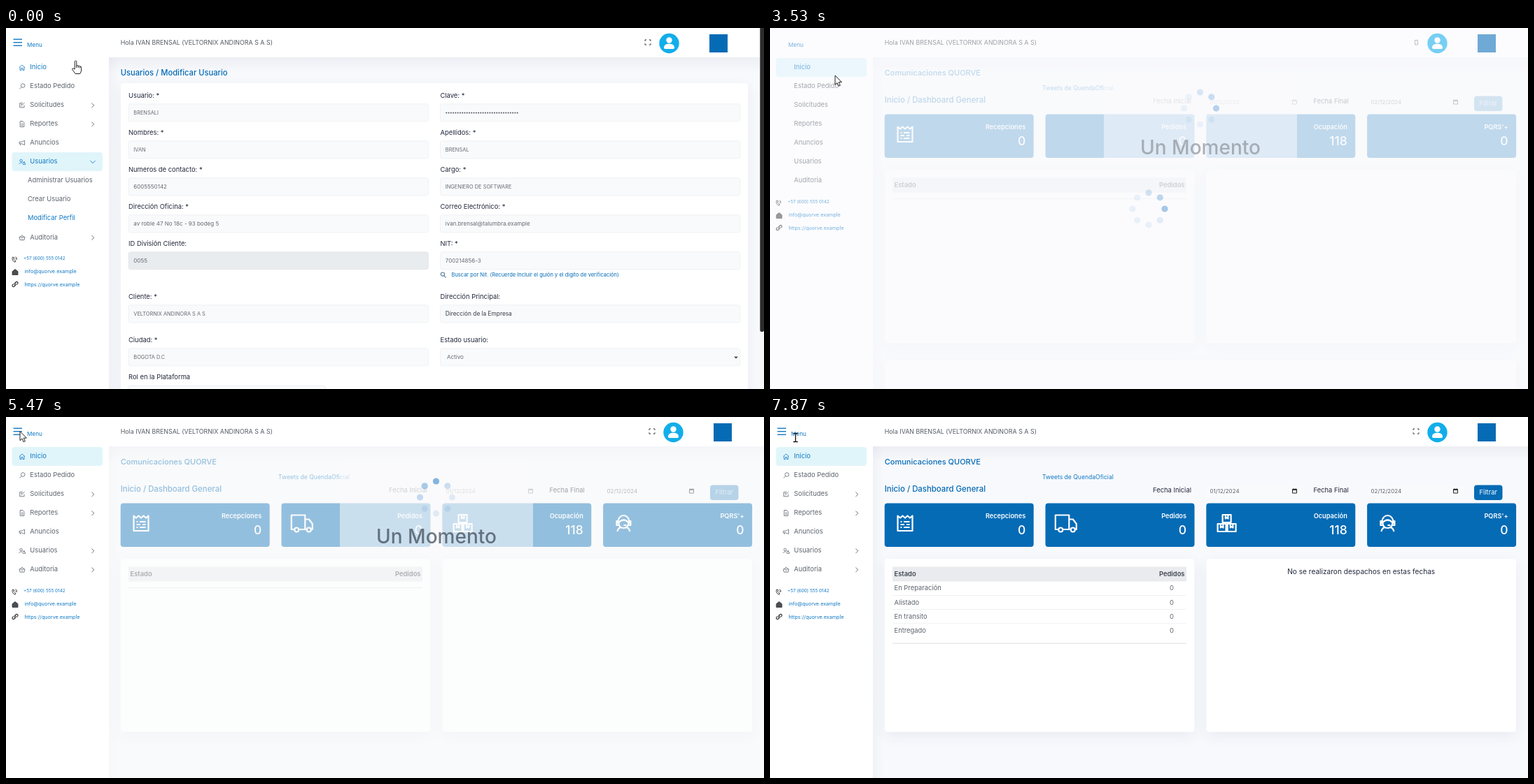
An HTML page with a canvas that plays this animation: 1083x517 px, repeating every 8 s.

```html
<!DOCTYPE html>
<html lang="es">
<head>
<meta charset="utf-8">
<title>Panel de usuarios</title>
<style>
html, body { margin: 0; width: 100%; height: 100%; overflow: hidden; background: #fff; }
canvas { display: block; width: 100%; height: 100%; }
</style>
</head>
<body>
<canvas id="stage"></canvas>
<script>
const W = 1083, H = 517, LOOP = 8000;
const canvas = document.getElementById('stage');
const g = canvas.getContext('2d');
const dpr = window.devicePixelRatio || 1;
canvas.width = W * dpr;
canvas.height = H * dpr;

const BLUE = '#056bb5', LINK = '#1179c4', GREY = '#5d646d', DARK = '#23283c';
const PILL = '#e0f5fa', PAGE = '#f8f9fc';

const clamp = v => Math.max(0, Math.min(1, v));
const ramp = (t, a, b) => clamp((t - a) / (b - a));

function text(s, x, y, size, color, weight = 400, align = 'left') {
  g.font = `${weight} ${size}px Inter, "Open Sans", sans-serif`;
  g.textAlign = align;
  g.fillStyle = color;
  g.fillText(s, x, y + size * 0.36);
}

function box(x, y, w, h, r, fill, stroke) {
  g.beginPath();
  g.roundRect(x, y, w, h, r);
  if (fill) { g.fillStyle = fill; g.fill(); }
  if (stroke) { g.strokeStyle = stroke; g.lineWidth = 0.8; g.stroke(); }
}

function dot(x, y, r, fill) {
  g.beginPath();
  g.arc(x, y, r, 0, 7);
  g.fillStyle = fill;
  g.fill();
}

function panel(x, y, w, h) {
  g.save();
  g.shadowColor = 'rgba(40,60,120,.07)';
  g.shadowBlur = 20 * dpr;
  g.shadowOffsetY = 6 * dpr;
  box(x, y, w, h, 4, '#fff');
  g.restore();
}

// Line icon given as a path around its own centre
function icon(d, x, y, color, lw = 0.9, fill) {
  const p = new Path2D(d);
  g.save();
  g.translate(x, y);
  if (fill) { g.fillStyle = fill; g.fill(p); }
  g.strokeStyle = color;
  g.lineWidth = lw;
  g.lineJoin = 'round';
  g.stroke(p);
  g.restore();
}

const ICON = {
  home: 'M-4 0L0-3.5 4 0M-3-.6V4H-1V1H1V4H3V-.6',
  search: 'M4-1A2.8 2.8 0 1 1-1.6-1A2.8 2.8 0 1 1 4-1M-.8 1L-3.6 3.8',
  edit: 'M3 0V3.3H-3.3V-3H1M-1.5 1.5L3.5-3.4M-2-1H0',
  doc: 'M-2.8-4H1L2.8-2V4H-2.8ZM-1.3 0H1.3M-1.3 2H1.3',
  horn: 'M-4-1.2H-1L3.6-3.4V3L-1 1.2H-4ZM-2.6 1.2V3.6',
  users: 'M.2-1.6A1.7 1.7 0 1 1-3.2-1.6A1.7 1.7 0 1 1 .2-1.6M-4.4 3.4Q-1.5-1 1.4 3.4M3.6-.4A1.4 1.4 0 1 1 .8-.4M1.8 1.4Q4-.2 4.8 3.8H1',
  audit: 'M-4-.6H4L3 3.6H-3ZM-2.8-.6L0-3.6 2.8-.6M0 .6V2.4',
  right: 'M-1.6-3.2L1.8 0-1.6 3.2',
  down: 'M-3.6-1.8L0 1.8 3.6-1.8',
  corners: 'M-4-1.6V-3.6H-1.8M1.8-3.6H4V-1.6M4 1.6V3.6H1.8M-1.8 3.6H-4V1.6',
  phone: 'M-2.6-3Q-4.4 2 1 4.4L2 2.8 0 1.4Q-1.2.6-1.2-1L0-2ZM1.4-3.4Q4-2.4 3.4.8M1.2-1.4Q2.2-1 2 .6',
  mail: 'M-4-.8L0-4 4-.8V4H-4Z',
  link: 'M-.6 1.4Q-2 0-.6-1.4L1-3Q2.4-4.2 3.6-3 4.6-1.8 3.4-.4L2.6.4M.6-1.4Q2 0 .6 1.4L-1 3Q-2.4 4.2-3.6 3-4.6 1.8-3.4.4L-2.6-.4',
  calendar: 'M-3-2.6H3V3H-3ZM-3-1.6H3M-1.6-3.6V-2.6M1.6-3.6V-2.6',
  list: 'M-10.5-10.5L-7-7.5-3.5-10.5 0-7.5 3.5-10.5 7-7.5 10.5-10.5V11H-10.5ZM-6.5-2H-4.5M-2-2H6.5M-6.5 2H-1M2 2H6.5M-6.5 6H-4.5M-2 6H6.5',
  truck: 'M-10.5 9H-15V-11.5H4.5V9H-4.5M4.5-5.5H10L15 1V9H13M4.5 9H7M-4.5 9.5A3 3 0 1 1-10.5 9.5A3 3 0 1 1-4.5 9.5M13 9.5A3 3 0 1 1 7 9.5A3 3 0 1 1 13 9.5',
  boxes: 'M-6-12H6V-1H-6ZM-13 1H-1V12H-13ZM1 1H13V12H1ZM-1.8-11V-6.5L0-8 1.8-6.5V-11M-8.8 2V6.5L-7 5-5.2 6.5V2M5.2 2V6.5L7 5 8.8 6.5V2',
  agent: 'M-8 1V-2A8 9 0 0 1 8-2V1M-8-3H-10V3H-7M8-3H10V3H7M-7-1Q0-8 7-1Q7 7 0 7T-7-1M-9 12Q-8 7-4 6M9 12Q8 7 4 6M0 3H4'
};

const CURSOR = {
  hand: 'M-1.3 12V1.3A1.3 1.3 0 0 1 1.3 1.3V7Q2.7 6 3.8 7.3 5.2 6.5 6.2 8 7.9 7.5 8.2 9.5V13Q8 16 6.2 18.5H-.4L-4.8 12.4Q-5 10.5-3.2 10.9ZM1.3 7V10M3.8 7.3V10M6.2 8V10.4',
  arrow: 'M0 0V13.2L3 10.4 5 15.2 7.3 14.2 5.2 9.6H9.4Z',
  beam: 'M-3.2-6H-1Q0-6 0-5Q0-6 1-6H3.2M0-5V5M-3.2 6H-1Q0 6 0 5Q0 6 1 6H3.2'
};

// time, x, y of the pointer tip
const PATH = [
  [0, 99.5, 47], [300, 78, 56], [600, 50, 60], [870, 36, 50], [1080, 62, 53],
  [1270, 54.5, 54], [1730, 54.5, 54], [2000, 36, 59], [2300, 60, 64], [2600, 81, 64],
  [3200, 93, 68], [3550, 93, 68], [4200, 42, 56], [4530, 39, 53], [5100, 21, 23],
  [5400, 20, 20.5], [6900, 20, 20.5], [7150, 17, 21], [7700, 17, 21], [7800, 36.5, 29.5]
];

function pointer(t) {
  const i = PATH.findIndex(k => k[0] > t);
  if (i < 0) return PATH[PATH.length - 1].slice(1);
  const [a, x0, y0] = PATH[i - 1], [b, x1, y1] = PATH[i];
  const u = ramp(t, a, b), e = u * u * (3 - 2 * u);
  return [x0 + (x1 - x0) * e, y0 + (y1 - y0) * e];
}

function drawCursor(t) {
  const [x, y] = pointer(t);
  const onLink = t < 2670 || (t > 3700 && y > 43);
  if (t >= 7770) icon(CURSOR.beam, x, y, '#111', 1.3);
  else icon(onLink ? CURSOR.hand : CURSOR.arrow, x, y, '#222', 1, '#fff');
}

// Eight fading dots, head running clockwise
function spinner(cx, cy, t, strength) {
  const head = 2.1 + (t - 3530) / 137.5;
  const tail = [1, 0.7, 0.5, 0.2];
  const at = n => n > 7 ? 1 : tail[Math.min(n, 3)];
  for (let i = 0; i < 8; i++) {
    const age = (((head - i) % 8) + 8) % 8;
    const k = Math.floor(age);
    const a = at(k) + (at(k + 1) - at(k)) * (age - k);
    const ang = (i - 2) * Math.PI / 4;
    dot(cx + 23 * Math.cos(ang), cy + 23 * Math.sin(ang), 4.6, `rgba(40,125,200,${a * strength})`);
  }
}

const MENU = [
  ['Inicio', 'home'], ['Estado Pedido', 'search'], ['Solicitudes', 'edit', 1],
  ['Reportes', 'doc', 1], ['Anuncios', 'horn'], ['Usuarios', 'users', 1], ['Auditoria', 'audit', 1]
];

function sidebar(open, active, icons) {
  g.fillStyle = '#fff';
  g.fillRect(0, 0, 147, H);
  if (icons) {
    g.fillStyle = LINK;
    for (const y of [15.5, 20, 24.5]) g.fillRect(10.5, y, 12.5, 1.4);
  }
  text('Menu', icons ? 30 : 26, 24.5, 8.2, LINK);
  box(8.5, active === 'Inicio' ? 43 : 178, 129.5, 27, 4, PILL);
  MENU.forEach(([name, ic, sub], i) => {
    const y = 56 + 27 * i + (open && i === 6 ? 81.5 : 0);
    const isOpen = open && i === 5;
    const color = i === 0 || isOpen ? LINK : GREY;
    text(name, 34.3, y, 9.4, color);
    if (!icons) return;
    icon(ICON[ic], 23, y + 0.5, color, 0.8);
    if (sub) icon(isOpen ? ICON.down : ICON.right, 124, y + 0.8, color);
  });
  if (open) ['Administrar Usuarios', 'Crear Usuario', 'Modificar Perfil'].forEach((s, i) =>
    text(s, 31, 218 + 27 * i, 9.4, i === 2 && active === 'Usuarios' ? LINK : GREY));
  const y = open ? 329.5 : 248.5;
  icon(ICON.phone, 12, y + 1.5, '#333', 0.9);
  icon(ICON.mail, 13, y + 20, '#333', 0.8, '#4a4f55');
  icon(ICON.link, 13, y + 37.5, '#333', 1.2);
  text('+57 (600) 555 0142', 25, y, 6.4, LINK);
  text('info@quorve.example', 26.5, y + 19, 7.2, LINK);
  text('https://quorve.example', 26.5, y + 37.5, 7.2, LINK);
}

function header(dx, icons) {
  let s = g.createLinearGradient(0, 42, 0, 64);
  s.addColorStop(0, 'rgba(40,50,90,.05)');
  s.addColorStop(1, 'rgba(40,50,90,0)');
  g.fillStyle = s;
  g.fillRect(147, 42, W, 22);
  s = g.createLinearGradient(147, 0, 163, 0);
  s.addColorStop(0, 'rgba(40,50,90,.035)');
  s.addColorStop(1, 'rgba(40,50,90,0)');
  g.fillStyle = s;
  g.fillRect(147, 42, 16, H);
  g.fillStyle = '#fff';
  g.fillRect(147, 0, W, 42);
  text('Hola IVAN BRENSAL (VELTORNIX ANDINORA S A S)', 163.7, 21, 8.9, '#555b63');
  if (icons) icon(ICON.corners, 917 + dx, 20.5, '#444', 1);
  else box(915.5 + dx, 17.5, 4, 6.5, 0, null, '#777');
  dot(947.5 + dx, 22, 14.2, '#12aeea');
  dot(947.5 + dx, 17.5, 4.2, '#fff');
  box(940 + dx, 22.7, 15, 7.3, [6, 6, 2, 2], '#fff');
  g.fillStyle = BLUE;
  g.fillRect(1005 + dx, 9, 26, 26);
}

function background() {
  g.fillStyle = PAGE;
  g.fillRect(0, 0, W, H);
}

// label, value, centre of label, right column
const FIELDS = [
  ['Usuario: *', 'BRENSALI', 97, 0], ['Clave: *', '', 97, 1],
  ['Nombres: *', 'IVAN', 150, 0], ['Apellidos: *', 'BRENSAL', 150, 1],
  ['Numeros de contacto: *', '6005550142', 203, 0], ['Cargo: *', 'INGENIERO DE SOFTWARE', 203, 1],
  ['Dirección Oficina: *', 'av roble 47 No 18c - 93 bodeg 5', 256, 0],
  ['Correo Electrónico: *', 'ivan.brensal@talumbra.example', 256, 1],
  ['ID División Cliente:', '0055', 309, 0], ['NIT: *', '700214856-3', 309, 1],
  ['Cliente: *', 'VELTORNIX ANDINORA S A S', 385, 0],
  ['Dirección Principal:', 'Dirección de la Empresa', 385, 1],
  ['Ciudad: *', 'BOGOTA D.C', 447, 0], ['Estado usuario:', 'Activo', 447, 1]
];

function formPage(t) {
  const clicked = t >= 1470;
  background();
  panel(164, 79, 896, 460);
  header(0, true);
  text('Usuarios / Modificar Usuario', 163.7, 64, 11.2, BLUE, 500);
  for (const [label, value, y, right] of FIELDS) {
    const x = right ? 620.5 : 175, off = label.startsWith('ID');
    text(label, x, y, 9.4, DARK);
    box(x, y + 11.8, 428.5, 25, 3, off ? '#e9ecef' : '#f9fafc', off ? '#e2e6ea' : '#eceff3');
    const caps = !/[a-z0-9]/.test(value);
    const size = caps ? 7.4 : value.startsWith('Dir') ? 8.3 : 8;
    text(value, x + (value === 'Activo' ? 9.5 : 7.3), y + 24, size, value.startsWith('Dir') ? '#363b44' : '#646a72');
  }
  for (let i = 0; i < 32; i++) dot(629.3 + i * 3.27, 121.5, 1.05, '#555b63');
  icon('M-2-1L0 1 2-1', 1043, 471.5, '#333', 1.3);
  icon('M2-1.4A2.6 2.6 0 1 1-3.2-1.4A2.6 2.6 0 1 1 2-1.4M1.2.6L4 3.6', 624.5, 354, '#5d7f9c', 1.2);
  text('Buscar por Nit. (Recuerde Incluir el guión y el digito de verificación)', 636.5, 353.5, 7.5, BLUE);
  text('Rol en la Plataforma', 175, 500, 9.4, DARK);
  box(175, 512.3, 281, 25, 3, '#f9fafc', '#e6eaef');
  g.fillStyle = '#f4f5f7';
  g.fillRect(1077, 0, 6, H);
  box(1077.3, -5, 5.7, 440, 3, '#2c2c2c');
  sidebar(true, clicked ? 'Inicio' : 'Usuarios', true);
  if (clicked) {
    box(-3, 505, 106, 15, 2, '#15181c');
    text('203.0.113.27/zorv4/index.php', 3, 511.3, 7, '#f2f2f2', 500);
  }
}

const CARDS = [
  ['Recepciones', '0', 'list'], ['Pedidos', '0', 'truck'],
  ['Ocupación', '118', 'boxes'], ["PQRS'+", '0', 'agent']
];

function dateField(label, lx, value, x) {
  text(label, lx, 104.5, 9.4, DARK);
  box(x, 97, 138, 18, 3, '#f9fafc');
  text(value, x + 5.5, 106, 8, '#5d646d');
  icon(ICON.calendar, x + 126.5, 106, '#222', 1);
}

function dashboard(t) {
  const icons = t >= 3600, filled = t >= 7130;
  const out = ramp(t, 7130, 7315);
  background();
  text('Comunicaciones QUORVE', 163.7, 64.5, 11, BLUE, 500);
  text('Tweets de QuendaOficial', 389, 86, 8.6, LINK);
  text('Inicio / Dashboard General', 163.7, 103, 11.4, BLUE, 500);
  dateField('Fecha Inicial', 547, '01/12/2024', 623);
  dateField('Fecha Final', 776.5, '02/12/2024', 853);
  // The button stays disabled while data loads
  g.globalAlpha = filled ? 1 : 0.65;
  box(1006, 97.5, 40.5, 21.5, 4, BLUE);
  text('Filtrar', 1026.2, 108, 9.4, '#fff', 400, 'center');
  g.globalAlpha = 1;

  CARDS.forEach(([name, n, ic], i) => {
    const x = 163.7 + i * 229.8;
    box(x, 123.5, 213, 62.5, 4, BLUE);
    if (icons || i === 0) icon(ICON[ic], x + 29.3, 152, '#fff', 2.2);
    text(name, x + 201.5, 141.3, 9.2, '#fff', 600, 'right');
    text(n, x + 201.5, 161.3, 17.5, '#fff', 500, 'right');
  });

  panel(163.7, 203, 442.6, 248);
  panel(623.4, 203, 442.6, 248);
  if (!icons) panel(163.7, 476, 902.3, 80);
  g.fillStyle = '#e9ebee';
  g.fillRect(175, 214.5, 420, 21);
  text('Estado', 177.5, 225, 9.4, '#3f4650', 600);
  text('Pedidos', 592.5, 225, 9.4, '#3f4650', 600, 'right');
  if (filled) {
    ['En Preparación', 'Alistado', 'En transito', 'Entregado'].forEach((s, i) => {
      const y = 245 + i * 20.2;
      text(s, 177.5, y, 9.4, GREY);
      text('0', 574, y, 9.4, GREY, 400, 'center');
      g.fillStyle = '#eceef1';
      if (i < 3) g.fillRect(175, y + 10, 420, 0.8);
    });
    text('No se realizaron despachos en estas fechas', 844.7, 221.5, 10.1, DARK, 400, 'center');
  }
  g.fillStyle = '#d9dce0';
  g.fillRect(175, filled ? 323.8 : 244, 420, 0.9);
  header(6, icons);

  if (out < 1) {
    g.fillStyle = `rgba(250,251,252,${0.58 * (1 - out)})`;
    g.fillRect(147, 42, W, H);
    g.save();
    g.globalAlpha = Math.sqrt(1 - out);
    box(477, 65.5, 276, 128, 4, 'rgba(252,252,253,.53)');
    spinner(614.5, 115, t, 0.6);
    text('Un Momento', 615, 171, 28, 'rgba(60,70,85,.72)', 500, 'center');
    g.restore();
  }
  sidebar(false, 'Inicio', icons);

  // Preloader sheet over the whole page
  const sheet = 1 - ramp(t, 3400, 3632);
  if (sheet > 0) {
    g.fillStyle = `rgba(248,249,252,${sheet})`;
    g.fillRect(0, 0, W, H);
    g.save();
    g.globalAlpha = Math.min(1, sheet * 1.2);
    spinner(541, 259, t, 0.8);
    g.restore();
  }
}

function draw(t) {
  g.setTransform(dpr, 0, 0, dpr, 0, 0);
  if (t < 2670) formPage(t);
  else dashboard(t);
  drawCursor(t);
}

const start = performance.now();
function tick() {
  draw((performance.now() - start) % LOOP);
  requestAnimationFrame(tick);
}
tick();
</script>
</body>
</html>
```
